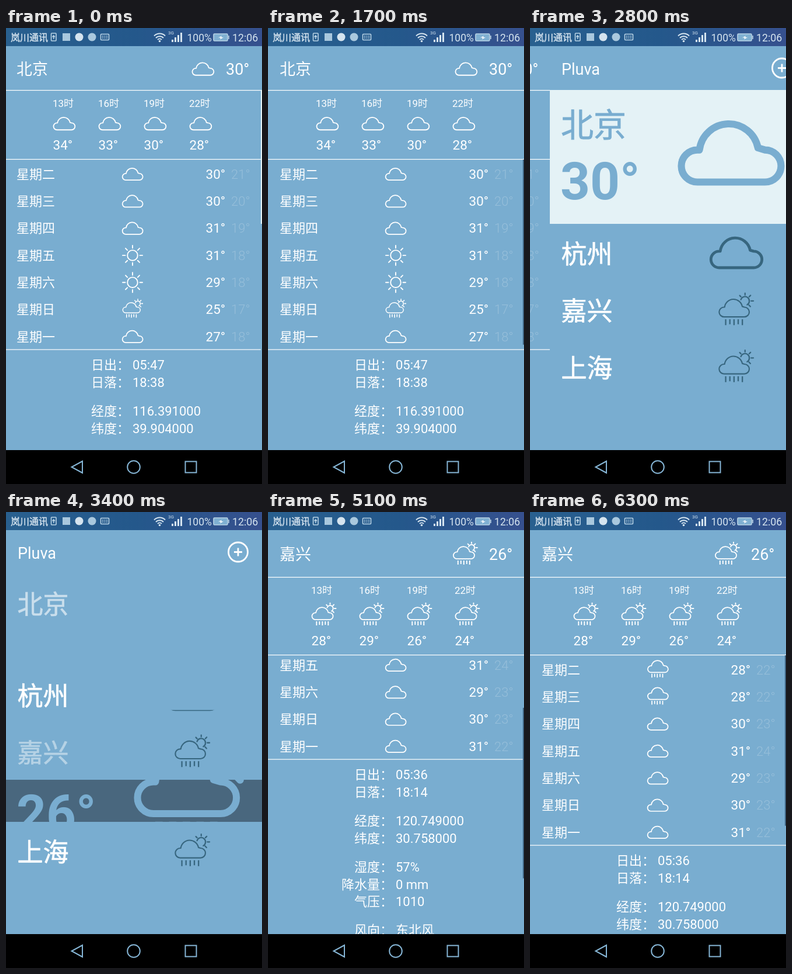
These frames come from a looping animation (439x780 px, 6400 ms). An HTML page:

```html
<!DOCTYPE html>
<html lang="zh-CN">
<head>
<meta charset="utf-8">
<title>天气</title>
<style>
  html, body { margin: 0; width: 100%; height: 100%; overflow: hidden; background: #79add0; }
  #stage { display: block; width: 439px; height: 780px; }
  text { font-family: Roboto, "Noto Sans CJK SC", "Noto Sans CJK", sans-serif; white-space: pre; }
</style>
</head>
<body>
<svg id="stage" viewBox="0 0 439 780" fill="#fff"></svg>
<script>
const LOOP = 6400, STEP = 100;
const SKY = '#79add0', TEAL = '#37667f';
const W = 439, BOTTOM = 722, CONTENT = 780;
const TOP = 106, ROW = 97.5, OPEN = 229;

// Piecewise linear motion: [ms, value]
const swipe = [[0, 2], [200, 0], [1700, 0], [2000, 18], [2400, 116], [2500, 215], [2600, 305],
  [2800, 405], [3000, 439], [3900, 439], [4100, 412], [4400, 280], [4500, 180], [4600, 100], [4800, 14], [4900, 0]];
const scroll = [[300, 0], [500, 70], [700, 165], [900, 222], [1000, 222], [1100, 174], [1300, 92],
  [1500, 30], [1700, 0], [4900, 0], [5000, 62], [5100, 147], [5300, 208], [5500, 222], [5700, 165],
  [5900, 84], [6100, 22], [6300, 0]];
const unfold = [[3100, 0], [3200, .06], [3300, .28], [3400, .548], [3500, 1]];

function at(keys, t) {
  const i = keys.findIndex(k => k[0] > t);
  if (i < 0) return keys[keys.length - 1][1];
  if (i === 0) return keys[0][1];
  const [t0, a] = keys[i - 1], [t1, b] = keys[i];
  return a + (b - a) * (t - t0) / (t1 - t0);
}

// Text is placed by the vertical centre of its line
const text = (x, y, size, s, attr = '') =>
  `<text x="${x}" y="${y + size * .37}" font-size="${size}" ${attr}>${s}</text>`;
const heavy = (color, w) => `stroke="${color}" stroke-width="${w}"`;
const line = y => `<rect y="${y}" width="${W}" height="1.2"/>`;

// Flat-bottomed cloud: a pill with a dome on top
const cloud = '<path d="M7.1 25A6.1 6.1 0 0 1 7.1 12.8H7.9A11.3 11.3 0 0 1 30.2 12L32.9 12.8A6.1 6.1 0 0 1 32.9 25Z"/>';
const rain = '<path d="M8.8 32v7m5-7v6m5-6v7m5-7v6m5-6v7" stroke-linecap="butt"/>';
const rays = [...Array(8).keys()].map(i => `<path d="M0 -12.5V-17" transform="rotate(${i * 45})"/>`).join('');
const shapes = {
  cloud,
  sun: `<circle r="8.8"/>${rays}`,
  rain: `${cloud}<g transform="translate(0 -4.5)">${rain}</g>`,
  mixed: `<g transform="translate(0 5.3) scale(.95)">${cloud}</g>${rain}
    <path d="M27 8.5A5.2 5.2 0 1 1 34.5 14.6M32 2.8V.8M37 5L38.6 3.4M39.3 10H42M36.7 15L38.4 16.8M27 5L25.6 3.6"/>`
};
const icon = (name, x, y, k = 1, color = '#fff', w = 1.9) =>
  `<g transform="translate(${x} ${y}) scale(${k})" fill="none" stroke="${color}" stroke-width="${w}"
    stroke-linecap="round" stroke-linejoin="round">${shapes[name]}</g>`;

const dayIcon = {
  cloud: y => icon('cloud', 200.7, y - 12.3, .92),
  sun: y => icon('sun', 219, y + .5),
  mixed: y => icon('mixed', 201.5, y - 18, .83),
  rain: y => icon('rain', 201, y - 18, .92)
};
const days = '二三四五六日一';
const labels = ['日出', '日落', '经度', '纬度', '湿度', '降水量', '气压', '风向', '风力', '风速'];
const infoY = [351, 381, 430, 460, 509, 539, 568, 617, 647, 677];

const cities = [
  { name: '北京', temp: 30, head: 70, rule: 106, split: 224, sky: 'cloud', hx: 83, gap: 78,
    hours: [34, 33, 30, 28], icons: ['cloud', 'cloud', 'cloud', 'sun', 'sun', 'mixed', 'cloud'],
    high: [30, 30, 31, 31, 29, 25, 27], low: [21, 20, 19, 18, 18, 17, 18],
    info: ['05:47', '18:38', '116.391000', '39.904000', '37%', '0 mm', '1009', '北风', '4-5', '24 km/h'] },
  { name: '嘉兴', temp: 26, head: 72, rule: 111, split: 244, sky: 'mixed', hx: 75, gap: 82,
    hours: [28, 29, 26, 24], icons: ['rain', 'rain', 'cloud', 'cloud', 'cloud', 'cloud', 'cloud'],
    high: [28, 28, 30, 31, 29, 30, 31], low: [22, 22, 23, 24, 23, 23, 22],
    info: ['05:36', '18:14', '120.749000', '30.758000', '57%', '0 mm', '1010', '东北风', '3-4', '18 km/h'] }
];

function cityPage(c) {
  const big = c.sky === 'cloud';
  const skyIcon = (x, y) => icon(c.sky, x, y, big ? .97 : 1);
  const view = BOTTOM - c.split - 1;
  const hours = c.hours.map((v, i) => {
    const x = c.hx + i * c.gap;
    return text(x - 1, c.rule + 23, 17, 13 + i * 3 + '时') + skyIcon(x - .5, c.rule + 44) +
      text(x - .5, c.split - 24, 22.5, v + '°');
  }).join('');
  const rows = c.icons.map((name, i) => {
    const y = 24.4 + i * 46.33;
    return text(20, y, 22, '星期' + days[i]) + dayIcon[name](y) + text(344.5, y, 22.5, c.high[i] + '°') +
      text(388, y, 22, c.low[i] + '°', 'fill-opacity=".22" font-weight="300"');
  }).join('');
  const info = labels.map((s, i) => text(214, infoY[i], 22, s + '：', 'text-anchor="end"') +
    text(219, infoY[i], 22, c.info[i])).join('');
  return `<g class="city">
    ${text(20, c.head, 27, c.name)}${skyIcon(big ? 320.5 : 317, big ? 56.5 : 51)}${text(379, c.head, 27, c.temp + '°')}
    ${line(c.rule)}${hours}${line(c.split)}
    <svg y="${c.split + 1}" width="${W}" height="${view}">
      <g class="body">${rows}${line(324.5)}${info}</g>
      <rect class="thumb" x="437" width="2" height="${view * view / CONTENT}" fill="#3f6482"/>
    </svg></g>`;
}

function row(name, sky) {
  const pic = sky === 'cloud' ? icon('cloud', 274, 17.5, 2.3, TEAL, 2.1) : icon('mixed', 289, 20, 1.43, TEAL, 1.6);
  return `<g class="row"><g class="name">${text(19.5, 51.5, 44, name, heavy('#fff', .7))}</g><g class="pic">${pic}</g></g>`;
}

const panel = (id, name, temp, bg, pic) => `<svg id="${id}" width="${W}" height="${OPEN}"><g fill="${SKY}">
  <rect width="${W}" height="${OPEN}" fill="${bg}"/>
  ${text(19, 59.5, 56, name, heavy(SKY, .8))}<text x="18" y="186.5" font-size="89" font-weight="700">${temp}°</text>${pic}</g></svg>`;

const listPage = `<g id="list">${text(20, 70, 27, 'Pluva')}
  <g fill="none" stroke="#fff" stroke-width="2.8"><circle cx="398" cy="68.500" r="16.500"/><path d="M391 68.500h14m-7-7v14"/></g>
  ${row('北京', 'cloud')}${row('杭州', 'cloud')}${row('嘉兴', 'mixed')}${row('上海', 'mixed')}
  ${panel('light', '北京', 30, '#e4f2f6', icon('cloud', 221, 45, 4.5, SKY, 2.7))}
  ${panel('dark', '嘉兴', 26, '#242e3c', icon('mixed', 221, 19, 4.7, SKY, 2.7))}</g>`;

const bars = [0, 1, 2, 3].map(i => `<rect x="${284 + i * 5}" y="${20 - i * 4}" width="3" height="${4 + i * 4}"/>`).join('');
const status = `<defs><linearGradient id="bar"><stop stop-color="#29608f"/><stop offset=".5" stop-color="#24588b"/>
  <stop offset="1" stop-color="#36508e"/></linearGradient></defs>
  <rect width="${W}" height="31" fill="url(#bar)"/>
  <g fill="#d5e4ef">${text(8, 16, 16, '岚川通讯', heavy('#d5e4ef', .4))}${text(310.5, 16.5, 17.5, '100%')}
  ${text(388, 16.5, 17.8, '12:06')}${text(278, 8.5, 8, '3G')}${bars}
  <circle cx="125.500" cy="15.500" r="7"/><circle cx="147.500" cy="15.500" r="7" fill="#a9c8de"/>
  <rect x="97" y="9" width="13" height="13" fill="#a9c8de"/></g>
  <g fill="none" stroke="#b9d3e5" stroke-width="1.6">
  <rect x="77.500" y="9" width="8.500" height="13" rx="1"/><path d="M81.700 19v-6m-2.300 2.500l2.300-2.500 2.300 2.500"/>
  <rect x="162.500" y="10.500" width="14" height="10" rx="1"/><path d="M165 14h9m-9 3h9" stroke-dasharray="2 1.500"/>
  <path d="M254 13.500a13.500 13.500 0 0 1 19 0M257 17a9 9 0 0 1 13 0M260 20a5 5 0 0 1 7 0" stroke="#d5e4ef" stroke-width="2"/>
  <rect x="356" y="10" width="24" height="12" rx="1.500" fill="#7fb0d2"/><path d="M382 13v6"/>
  </g><circle cx="263.500" cy="22.500" r="1.800" fill="#d5e4ef"/>
  <path d="M364 16.500l6-3-1 2.500h4l-6 3.500 1-3z"/>`;
const nav = `<rect y="${BOTTOM}" width="${W}" height="58" fill="#000"/>
  <g fill="none" stroke="#86b6d6" stroke-width="2"><path d="M131 741V761L112.500 751Z"/>
  <circle cx="219" cy="751" r="10.800"/><rect x="307.500" y="741.500" width="19" height="19"/></g>`;

const stage = document.getElementById('stage');
stage.innerHTML = `<rect width="${W}" height="780" fill="${SKY}"/>` +
  cities.map(cityPage).join('') + listPage + status + nav;

const $$ = q => [...stage.querySelectorAll(q)];
const pages = $$('.city'), bodies = $$('.body'), thumbs = $$('.thumb'), rows = $$('.row');
const [list] = $$('#list'), [light] = $$('#light'), [dark] = $$('#dark');
const move = (el, x, y) => el.setAttribute('transform', `translate(${x} ${y})`);
const show = (el, on) => el.style.display = on ? '' : 'none';
const part = (i, name) => rows[i].querySelector(name);

function drawList(p) {
  const grow = OPEN - ROW, moving = p > 0 && p < 1;
  const second = TOP + (p ? ROW + grow * (1 - p) : OPEN), third = second + ROW;
  [TOP, second, third, TOP + OPEN + 2 * ROW].forEach((y, i) => move(rows[i], 0, y));
  show(rows[0], p > 0);
  show(rows[2], p < 1);
  part(0, '.name').style.opacity = moving ? .6 : 1;
  show(part(0, '.pic'), p === 1);
  part(2, '.name').style.opacity = 1 - p;
  // The second row's icon emerges below the closing panel's old edge
  part(1, '.pic').style.clipPath = moving ? `inset(${Math.max(0, TOP + OPEN - second - 18)}px -9px -9px -9px)` : '';

  light.setAttribute('y', TOP);
  show(light, p === 0);
  show(dark, p > 0);
  dark.setAttribute('y', third + (moving ? ROW : 0));
  dark.setAttribute('height', moving ? grow * p : OPEN);
  move(dark.firstElementChild, 0, moving ? -ROW : 0);
  dark.querySelector('rect').style.opacity = p;
}

function draw(ms) {
  const t = Math.floor(ms % LOOP / STEP) * STEP;
  const x = at(swipe, t), y = at(scroll, t), city = t < 3500 ? 0 : 1;
  const bar = (t >= 400 && t < 2000) || t >= 5000;
  pages.forEach((page, i) => {
    show(page, i === city && x < W);
    move(page, -x, 0);
    move(bodies[i], 0, -y);
    show(thumbs[i], bar);
    thumbs[i].setAttribute('y', y * (BOTTOM - cities[i].split - 1) / CONTENT);
  });
  move(list, W - x, 0);
  drawList(at(unfold, t));
}

const start = performance.now();
function tick() {
  draw(performance.now() - start);
  requestAnimationFrame(tick);
}
tick();
</script>
</body>
</html>
```
